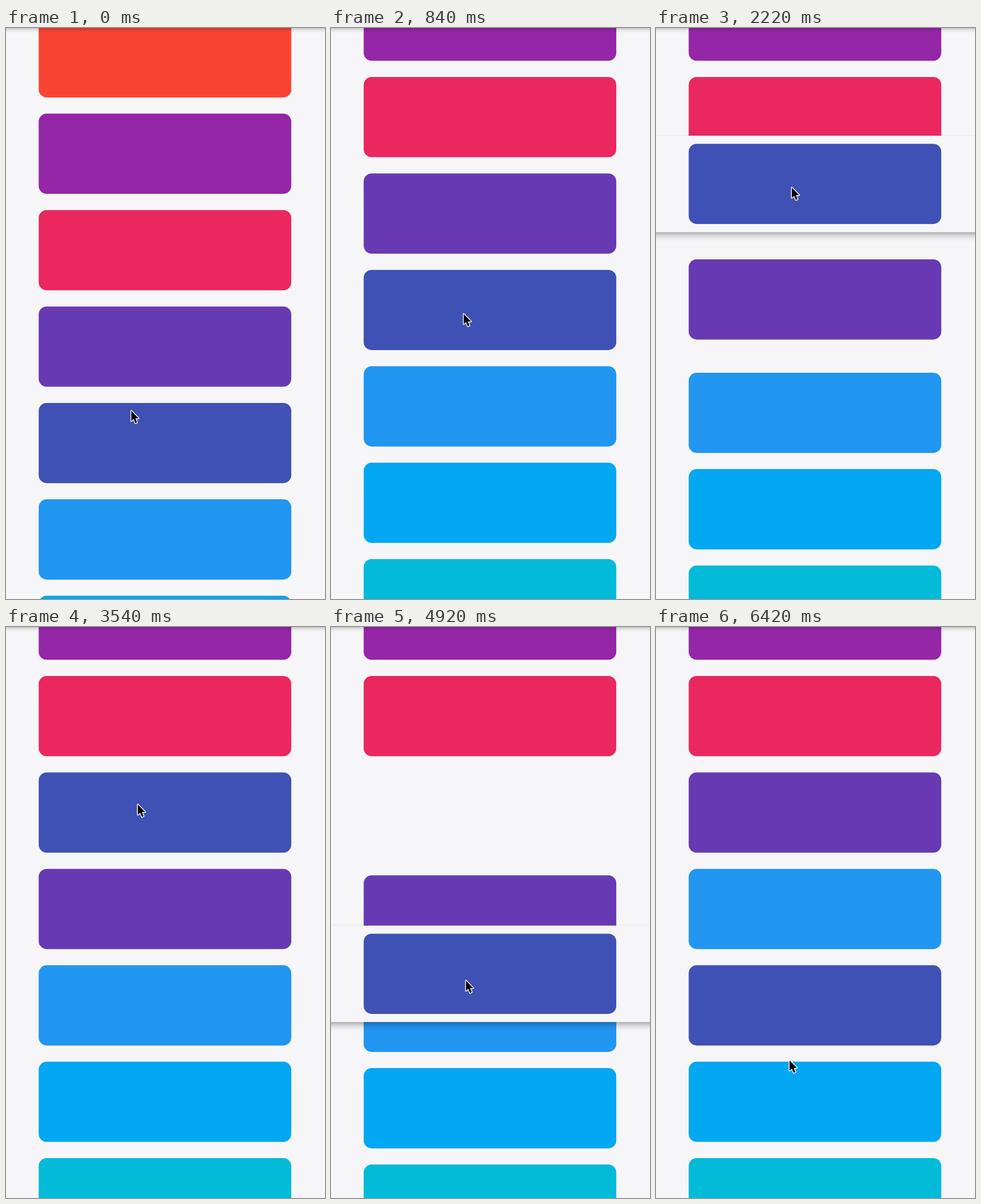
An HTML page with a canvas that plays this animation: 559 px wide and 1002 px high, repeating every 6.6 s.

```html
<!DOCTYPE html>
<html lang="en">
<head>
<meta charset="utf-8">
<title>Reorderable list</title>
<style>
  html, body { margin: 0; width: 100%; height: 100%; overflow: hidden; background: #f6f6f8; }
  canvas { display: block; }
</style>
</head>
<body>
<canvas id="stage" width="559" height="1002"></canvas>
<script>
const W = 559, H = 1002, LOOP = 6600, STEP = 60;
const ctx = document.getElementById('stage').getContext('2d');

const BG = '#f6f6f8';
const COLORS = ['#f94434', '#9626a8', '#ea275f', '#673ab3', '#3f51b4', '#2196f1', '#04a7f2', '#01bbd8'];
const HELD = COLORS[4];
const REST = COLORS.filter(c => c !== HELD);

const LEFT = 57.3, CARD_W = 442.6, CARD_H = 140.8, RADIUS = 14;
const PITCH = 169.2, MARGIN = (PITCH - CARD_H) / 2, GAP = PITCH + 11.3;
const TOP = -18.9, SCROLLED = 233.5, SCROLL_MS = 720;
const LAG = 48, SWAP_MS = 200;

const clamp = v => Math.min(1, Math.max(0, v));
const easeOut = u => 1 - (1 - u) ** 2;
const easeBoth = u => u * u * (3 - 2 * u);

// Pointer strokes, each starting where the one before ended
const START = { x: 218, y: 668.7 };
const MOVES = [
  { at: 0, ms: 360, x: 231, y: 498.7, ease: easeOut },
  { at: 1872, ms: 308, x: 236.5, y: 277, ease: easeBoth },
  { at: 2560, ms: 640, x: 229.5, y: 308.5, ease: easeBoth },
  { at: 4508, ms: 860, x: 237, y: 732.5, ease: easeOut },
  { at: 5440, ms: 200, x: 237, y: 774, ease: easeOut },
  { at: 5880, ms: 320, x: 232.5, y: 757.5, ease: easeBoth }
];

// Each drag leaves a slot; the gap then moves on to other slots
const DRAGS = [
  { from: 1500, to: 3120, slot: 4, swaps: [{ at: 2053, slot: 3 }] },
  { from: 4140, to: 6360, slot: 3, swaps: [{ at: 4920, slot: 4 }, { at: 5572, slot: 5 }] }
];

const cardY = (slot, scroll = SCROLLED) => TOP + PITCH * slot - scroll;

function pointer(t) {
  return MOVES.reduce((p, m) => {
    const k = m.ease(clamp((t - m.at) / m.ms));
    return { x: p.x + (m.x - p.x) * k, y: p.y + (m.y - p.y) * k };
  }, START);
}

function card(y, color) {
  ctx.fillStyle = color;
  ctx.beginPath();
  ctx.roundRect(LEFT, y, CARD_W, CARD_H, RADIUS);
  ctx.fill();
}

// Shadow fading from y over a signed depth
function shade(y, depth, alpha) {
  const g = ctx.createLinearGradient(0, y, 0, y + depth);
  for (let p = 0; p <= 1; p += 0.25) {
    g.addColorStop(p, `rgba(0,0,10,${alpha * (1 - p) ** 2})`);
  }
  ctx.fillStyle = g;
  ctx.fillRect(0, y, W, depth);
}

function liftedRow(y) {
  const top = y - MARGIN;
  shade(top, -3, 0.08);
  shade(top + PITCH, 18, 0.3);
  ctx.fillStyle = BG;
  ctx.fillRect(0, top, W, PITCH);
  card(y, HELD);
}

function cursor({ x, y }) {
  const arrow = new Path2D('M1.5 3V21L5.6 17.4L8.7 24.7L11.7 23.4L8.7 16.3H14.4Z');
  ctx.save();
  ctx.translate(x, y);
  ctx.lineJoin = 'round';
  ctx.lineWidth = 2.8;
  ctx.strokeStyle = '#fff';
  ctx.stroke(arrow);
  ctx.fillStyle = '#000';
  ctx.fill(arrow);
  ctx.restore();
}

function drawDrag({ from, slot, swaps }, t) {
  REST.forEach((color, k) => {
    let open = +(k >= slot);
    for (const s of swaps) open += ((k >= s.slot) - open) * clamp((t - s.at) / SWAP_MS);
    card(cardY(k) + open * GAP, color);
  });
  liftedRow(cardY(slot) + pointer(Math.max(from, t - LAG)).y - pointer(from).y);
}

function drawList(t) {
  const slot = t < DRAGS[0].to ? 4 : t < DRAGS[1].to ? 3 : 5;
  const scroll = SCROLLED * easeOut(clamp(t / SCROLL_MS));
  REST.toSpliced(slot, 0, HELD).forEach((color, i) => card(cardY(i, scroll), color));
}

function draw(t) {
  ctx.fillStyle = BG;
  ctx.fillRect(0, 0, W, H);
  const drag = DRAGS.find(d => t >= d.from && t < d.to);
  if (drag) drawDrag(drag, t);
  else drawList(t);
  shade(0, 10, 0.2);
  cursor(pointer(t));
}

const begin = performance.now();
function tick() {
  const t = (performance.now() - begin) % LOOP;
  draw(Math.floor(t / STEP) * STEP);
  requestAnimationFrame(tick);
}
tick();
</script>
</body>
</html>
```
